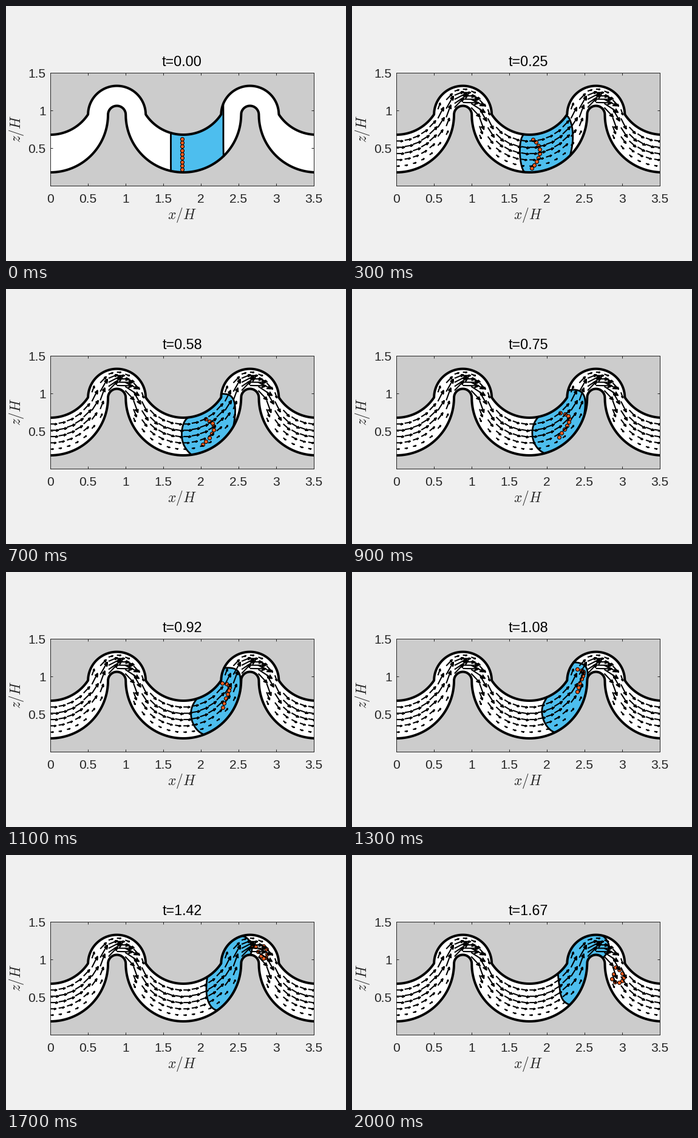
Animation, 560 px wide and 420 px high, one loop 2.1 s. Source, as a matplotlib script:

```python
import numpy as np
import matplotlib.pyplot as plt
from matplotlib.animation import FuncAnimation
from matplotlib.collections import LineCollection

STAGE_W, STAGE_H, DPI = 560, 420, 100
LEFT, TOP, RIGHT, BOTTOM = 73, 110, 506.5, 295.8
UNIT = (RIGHT - LEFT) / 3.5
PERIOD = 1.77 * UNIT
FRAMES, INTERVAL = 21, 100
PT = 72 / DPI
DARK = "#262626"

plt.rcParams.update({"font.family": "Liberation Sans", "mathtext.fontset": "cm"})


# Channel walls, in stage pixels (y down)
def offsets(x):
    d = np.abs((x - LEFT + PERIOD / 2) % PERIOD - PERIOD / 2)
    return d, PERIOD / 2 - d


def arc(r, d):
    return np.sqrt(np.maximum(r * r - d * d, 0))


def upper(x):
    d, c = offsets(x)
    return np.where(c < 47.5, 179 - arc(47.5, c), 137.6 + arc(74.4, d))


def lower(x):
    d, c = offsets(x)
    return np.where(c < 14.6, 179 - arc(14.6, c), 179 + arc(95, d))


xs = np.arange(LEFT - 4, RIGHT + 4, 0.1)
roof = np.column_stack([xs, upper(xs)])
floor = np.column_stack([xs, lower(xs)])


# Flow: parabolic profile over a harmonic cross-channel coordinate
def solve_flow():
    x = LEFT + np.arange(round(PERIOD))
    y = np.arange(120, 285)[:, None]
    lo, up = lower(x), upper(x)
    phi = np.clip((lo - y) / (lo - up), 0, 1)
    inside = (y > up) & (y < lo)
    for _ in range(2500):
        mean = np.roll(phi, 1, 1) + np.roll(phi, -1, 1)
        mean[1:-1] += phi[2:] + phi[:-2]
        phi = np.where(inside, mean / 4, phi)
    psi = 3 * phi**2 - 2 * phi**3
    wrapped = np.hstack([psi[:, -1:], psi, psi[:, :1]])
    return -np.gradient(psi, axis=0), np.gradient(wrapped, axis=1)[:, 1:-1]


def flow_arrows(scale=535):
    u, v = solve_flow()
    x, eta = np.meshgrid(LEFT + np.arange(32) * PERIOD / 16, np.arange(1, 6) / 6)
    x, eta = x.ravel(), eta.ravel()
    y = lower(x) + eta * (upper(x) - lower(x))
    row = np.rint(y - 120).astype(int)
    col = np.rint((x - LEFT) % PERIOD).astype(int) % u.shape[1]
    tail = np.column_stack([x, y])
    step = scale * np.column_stack([u[row, col], v[row, col]])
    side = step[:, ::-1] * [-1, 1]
    tip = tail + step
    barbs = [tip - 0.24 * step + s * 0.11 * side for s in (1, -1)]
    return np.stack([tail, tip, barbs[0], tip, barbs[1]], axis=1)


# Poses: five points per curve, joined smoothly in time
BEADS_T = [0, 3, 5, 9, 13, 15, 17, 20]
BEADS = [
    [(290, 219), (290, 231.5), (290, 244), (290, 256.5), (290, 269)],
    [(298, 220), (307, 230), (309, 243), (304, 256), (296, 267)],
    [(314, 219), (323, 228), (325, 239), (319, 253), (308, 263)],
    [(343, 204), (356, 209), (357, 219), (350, 231), (341, 244)],
    [(371, 160), (381, 164), (380, 171), (375, 183), (371, 197)],
    [(393, 144), (406, 149), (402, 156), (392, 161), (382, 172)],
    [(424, 150), (430, 163), (424, 170), (415, 159), (406, 149)],
    [(434, 185), (445, 195), (445, 207), (433, 209), (431, 196)],
]
EDGE_T = [0, 3, 5, 9, 13, 17, 20]
REAR = [
    [(271.5, 209), (271.5, 225), (271.5, 241), (271.5, 257), (271.5, 272)],
    [(283, 212), (278, 222), (276.5, 241), (279, 262), (285, 273)],
    [(293, 212), (285, 222), (282.5, 240), (285, 258), (294, 273)],
    [(307, 210), (299, 224), (297, 240), (302, 257), (317, 270)],
    [(321, 206), (315, 218), (313, 233), (319, 251), (334, 264)],
    [(331, 200), (330, 218), (331, 233), (336, 247), (347, 255)],
    [(339, 195), (341, 212), (343, 226), (347, 238), (358, 246)],
]
FRONT = [
    [(358, 161), (358, 182), (358, 204), (358, 225), (358, 247)],
    [(351, 184), (357, 184), (362.5, 200), (363.5, 222), (359, 246)],
    [(355, 178), (363, 180), (369, 192), (370, 214), (365, 240)],
    [(356, 167), (366, 166), (378, 170), (384, 184), (384, 211)],
    [(365, 149), (375, 150), (384, 155), (388, 165), (387, 180)],
    [(388, 134), (397, 137), (403, 145), (405, 155), (402, 165)],
    [(410, 132), (418, 138), (423, 148), (422, 158), (413, 170)],
]


def pose(times, keys, n):
    t, k = np.array(times, float), np.array(keys, float)
    slope = np.gradient(k, t, axis=0)
    i = min(np.searchsorted(t, n, side="right") - 1, len(t) - 2)
    h = t[i + 1] - t[i]
    s = (n - t[i]) / h
    a, b = k[i], k[i + 1]
    return (a + (b - a) * s * s * (3 - 2 * s)
            + h * s * (1 - s) * ((1 - s) * slope[i] - s * slope[i + 1]))


def curve(points, count):
    s = np.linspace(0, 1, 5)
    q = np.linspace(0, 1, count)
    return np.column_stack([np.polyval(np.polyfit(s, c, 4), q) for c in points.T])


def nearest(wall, p):
    return int(np.argmin(np.hypot(*(wall - p).T)))


def edge(keys, n):
    pts = pose(EDGE_T, keys, n)
    i, j = nearest(roof, pts[0]), nearest(floor, pts[-1])
    pts[0], pts[-1] = roof[i], floor[j]
    return curve(pts, 40), i, j


fig = plt.figure(figsize=(STAGE_W / DPI, STAGE_H / DPI), dpi=DPI, facecolor="#f0f0f0")
ax = fig.add_axes([LEFT / STAGE_W, 1 - BOTTOM / STAGE_H,
                   (RIGHT - LEFT) / STAGE_W, (BOTTOM - TOP) / STAGE_H],
                  facecolor="#cccccc")
ax.set(xlim=(LEFT, RIGHT), ylim=(BOTTOM, TOP))
xticks = LEFT + UNIT * np.arange(8) / 2
yticks = BOTTOM - UNIT * np.arange(1, 4) / 2
ax.set_xticks(xticks)
ax.set_yticks(yticks)
ax.tick_params(direction="in", length=4.3 * PT, width=PT, color=DARK,
               top=True, right=True, labelleft=False, labelbottom=False)
for spine in ax.spines.values():
    spine.set(color=DARK, linewidth=PT)


def label(x, y, s, size, color=DARK, **kw):
    kw = {"ha": "center", "va": "baseline", **kw}
    return fig.text(x / STAGE_W, 1 - y / STAGE_H, s, fontsize=size * PT, color=color, **kw)


for k, x in enumerate(xticks):
    label(x, 324, f"{k / 2:g}", 21)
for k, y in enumerate(yticks, 1):
    label(65.5, y + 8, f"{k / 2:g}", 21, ha="right")
label(290, 351, "$x/H$", 23.5)
label(17, 202, "$z/H$", 23.5, rotation=90, va="center")
title = label(290, 99, "", 23.4, "black")

ax.fill_between(xs, roof[:, 1], floor[:, 1], color="white", lw=0, zorder=1)
blob, = ax.fill([0], [0], color="#4dbeee", lw=0, zorder=2)
ends = [ax.plot([], [], color="black", lw=2.8 * PT, zorder=3)[0] for _ in range(2)]
for wall in (roof, floor):
    ax.plot(*wall.T, color="black", lw=4 * PT, zorder=4)
beads, = ax.plot([], [], "o", ms=6 * PT, mfc="#ff6020", mec="black",
                 mew=1.1 * PT, zorder=5)
arrows = LineCollection(flow_arrows(), colors="black", linewidths=2.1 * PT, zorder=6)
ax.add_collection(arrows, autolim=False)


def draw(n):
    rear, i0, j0 = edge(REAR, n)
    front, i1, j1 = edge(FRONT, n)
    blob.set_xy(np.vstack([roof[i0:i1], front, floor[j0:j1][::-1], rear[::-1]]))
    for line, pts in zip(ends, (rear, front)):
        line.set_data(*pts.T)
    beads.set_data(*curve(pose(BEADS_T, BEADS, n), 9).T)
    arrows.set_visible(n > 0)
    title.set_text(f"t={n / 12:.2f}")
    return [blob, *ends, beads, arrows, title]


anim = FuncAnimation(fig, draw, frames=FRAMES, interval=INTERVAL,
                     repeat=True, repeat_delay=0, blit=False)
plt.show()
```
